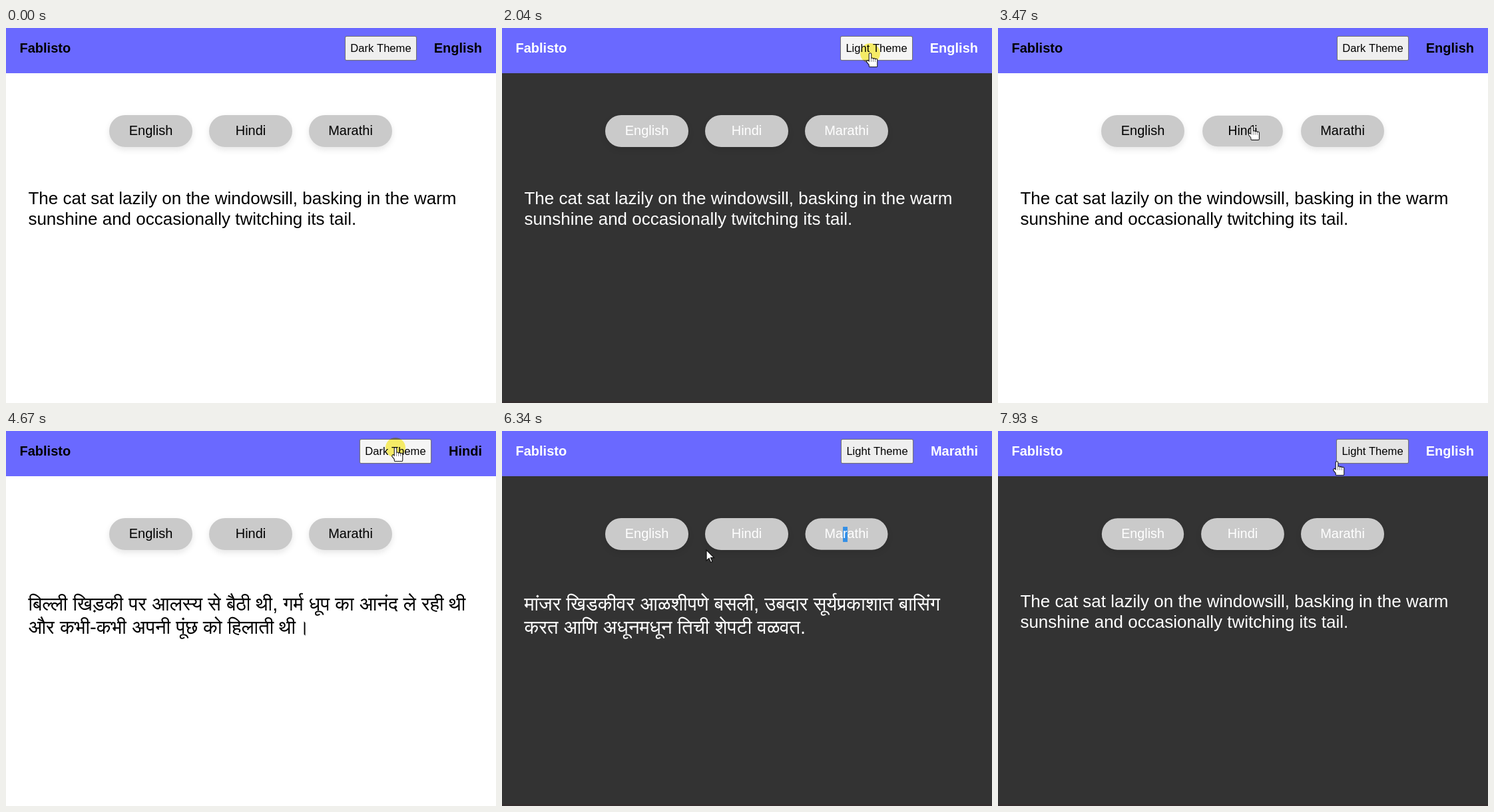
Write an HTML page with a canvas that moves like this. It is 736x564 px and loops after 8 s.

```html
<!DOCTYPE html>
<html lang="en">
<head>
<meta charset="utf-8">
<title>Language switcher</title>
<style>
  html, body { margin: 0; width: 100%; height: 100%; overflow: hidden; background: #fff; }
  canvas { display: block; }
</style>
</head>
<body>
<canvas id="stage" width="736" height="564"></canvas>
<script>
const ctx = document.getElementById('stage').getContext('2d');
const LOOP = 8000;
const FADE = 300;
const HIGHLIGHT_FADE = 55;
const PRESS = 90;
const SANS = '"Liberation Sans", Arial, "Noto Sans", sans-serif';

const LATIN = { size: 26, baseline: 265, leading: 31 };
const DEVANAGARI = { size: 29.2, baseline: 270, leading: 35 };
const LANGUAGES = {
  English: { script: LATIN, lines: [
    'The cat sat lazily on the windowsill, basking in the warm',
    'sunshine and occasionally twitching its tail.'] },
  Hindi: { script: DEVANAGARI, lines: [
    'बिल्ली खिड़की पर आलस्य से बैठी थी, गर्म धूप का आनंद ले रही थी',
    'और कभी-कभी अपनी पूंछ को हिलाती थी।'] },
  Marathi: { script: DEVANAGARI, lines: [
    'मांजर खिडकीवर आळशीपणे बसली, उबदार सूर्यप्रकाशात बासिंग',
    'करत आणि अधूनमधून तिची शेपटी वळवत.'] }
};
const PILL = { y: 131, width: 125, height: 48 };
const PILLS = Object.keys(LANGUAGES).map((name, i) => ({ name, x: 155 + 150 * i }));

const CLICKS = [
  { time: 905 }, { time: 2095 }, { time: 3700, language: 'Hindi' },
  { time: 4735 }, { time: 5610, language: 'Marathi' }, { time: 6790, language: 'English' }
];
const SELECTION = { from: 5650, to: 6720 };

// Pointer moves: start, end, x, y, sag
const POINTER_START = [690, 505];
const MOVES = [
  [120, 880, 566, 25],
  [890, 955, 565, 38],
  [1500, 1710, 553, 38],
  [2850, 3600, 367, 157],
  [3730, 4520, 585, 25],
  [4760, 5420, 510, 150],
  [5930, 6340, 307, 179, 18],
  [6350, 6690, 230, 166],
  [7580, 7930, 509, 46]
];

const clamp = v => Math.max(0, Math.min(1, v));
const ease = k => k * k * (3 - 2 * k);

function pointerAt(t) {
  let [x, y] = POINTER_START;
  for (const [start, end, toX, toY, sag = 0] of MOVES) {
    if (t < start) break;
    const k = ease(clamp((t - start) / (end - start)));
    x += (toX - x) * k;
    y += (toY - y) * k + sag * Math.sin(Math.PI * k);
  }
  return [x, y];
}

function overPill(pill, [x, y]) {
  return x > pill.x && x < pill.x + PILL.width && y > PILL.y && y < PILL.y + PILL.height - 3;
}

// A linear transition equals the hover state averaged over its duration
function pillScale(pill, t) {
  const samples = 60;
  let hovered = 0;
  for (let i = 0; i < samples; i++) {
    if (overPill(pill, pointerAt(t - i * FADE / samples))) hovered++;
  }
  return 1 - 0.1 * hovered / samples;
}

function write(text, x, y, size, color, align = 'left', weight = 'normal') {
  ctx.font = `${weight} ${size}px ${SANS}`;
  ctx.textAlign = align;
  ctx.fillStyle = color;
  ctx.fillText(text, x, y);
  return ctx.measureText(text).width;
}

function fillBox(x, y, w, h, radius, color) {
  ctx.beginPath();
  ctx.roundRect(x, y, w, h, radius);
  ctx.fillStyle = color;
  ctx.fill();
}

function drawPill(pill, t, textColor) {
  const { width, height } = PILL;
  const scale = pillScale(pill, t);
  ctx.save();
  ctx.translate(pill.x + width / 2, PILL.y + height / 2);
  ctx.scale(scale, scale);
  ctx.save();
  ctx.shadowColor = 'rgba(0,0,0,.1)';
  ctx.shadowBlur = 10;
  ctx.shadowOffsetY = 4;
  fillBox(-width / 2, -height / 2, width, height, height / 2, '#cacaca');
  ctx.restore();
  if (pill.name === 'Marathi' && t > SELECTION.from && t < SELECTION.to) {
    fillBox(-5.5, -11, 7, 23, 0, '#338fe6');
  }
  write(pill.name, 0, 6, 20, textColor, 'center');
  ctx.restore();
}

function drawThemeButton(label, x, width, color) {
  fillBox(x, 12, width, 37, 2.5, '#707070');
  fillBox(x + 1, 13, width - 2, 35, 1.5, color);
  write(label, x + width / 2, 36, 16.6, '#000', 'center');
}

function drawHand() {
  ctx.lineCap = 'round';
  ctx.beginPath();
  for (let finger = 0; finger < 4; finger++) {
    ctx.moveTo(finger * 3, finger ? 8 + finger * 0.7 : 1.5);
    ctx.lineTo(finger * 3, 19);
  }
  ctx.moveTo(-3.5, 12.5);
  ctx.lineTo(1, 18);
  for (const [color, width] of [['#111', 4.6], ['#fff', 2.5]]) {
    ctx.strokeStyle = color;
    ctx.lineWidth = width;
    ctx.stroke();
  }
  fillBox(0, 13, 9, 7, 1, '#fff');
}

function drawArrow() {
  const arrow = new Path2D('M0 0V16L4 12.5L6.5 18.5L9 17.5L6.5 11.6H11.5Z');
  ctx.fillStyle = '#fff';
  ctx.strokeStyle = '#111';
  ctx.lineWidth = 1.2;
  ctx.fill(arrow);
  ctx.stroke(arrow);
}

function drawHighlight([x, y], alpha) {
  ctx.save();
  ctx.globalCompositeOperation = 'multiply';
  ctx.beginPath();
  ctx.arc(x, y, 15, 0, 2 * Math.PI);
  ctx.fillStyle = `rgba(255,243,80,${alpha})`;
  ctx.fill();
  ctx.restore();
}

function draw(t) {
  const past = CLICKS.filter(click => click.time <= t);
  const switches = past.filter(click => !click.language);
  const language = past.filter(click => click.language).pop()?.language ?? 'English';
  const dark = switches.length % 2 === 1;
  const faded = clamp((t - (switches.at(-1)?.time ?? -FADE)) / FADE);
  const shade = Math.round(255 * (dark ? faded : 1 - faded));
  const ink = dark ? '#fff' : '#000';

  fillBox(0, 0, 736, 564, 0, dark ? '#333' : '#fff');
  if (dark) fillBox(0, 561, 736, 3, 0, '#352f30');
  fillBox(0, 0, 736, 68, 0, '#6a69ff');

  write('Fablisto', 20.5, 37, 20, ink, 'left', 'bold');
  const labelWidth = write(language, 715, 37, 20, ink, 'right', 'bold');

  const pointer = pointerAt(t);
  const [x, y] = pointer;
  const click = CLICKS.find(c => t > c.time - PRESS && t < c.time + HIGHLIGHT_FADE);
  const width = dark ? 109 : 108;
  const left = Math.round(689 - labelWidth) - width;
  const overTheme = x > left && x < left + width && y > 12 && y < 49;
  const pressed = click && t < click.time;
  drawThemeButton(dark ? 'Light Theme' : 'Dark Theme', left, width,
    !overTheme ? '#efefef' : pressed ? '#f5f5f5' : '#e5e5e5');

  for (const pill of PILLS) drawPill(pill, t, `rgb(${shade},${shade},${shade})`);

  const { script, lines } = LANGUAGES[language];
  lines.forEach((line, i) =>
    write(line, 33.4, script.baseline + i * script.leading, script.size, ink));

  if (click) drawHighlight(pointer, 0.85 * (1 - clamp((t - click.time) / HIGHLIGHT_FADE)));
  if (t < MOVES[0][0]) return;
  ctx.save();
  ctx.translate(x, y);
  if (overTheme || PILLS.some(pill => overPill(pill, pointer))) drawHand();
  else drawArrow();
  ctx.restore();
}

const start = performance.now();
function tick() {
  draw((performance.now() - start) % LOOP);
  requestAnimationFrame(tick);
}
tick();
</script>
</body>
</html>
```
